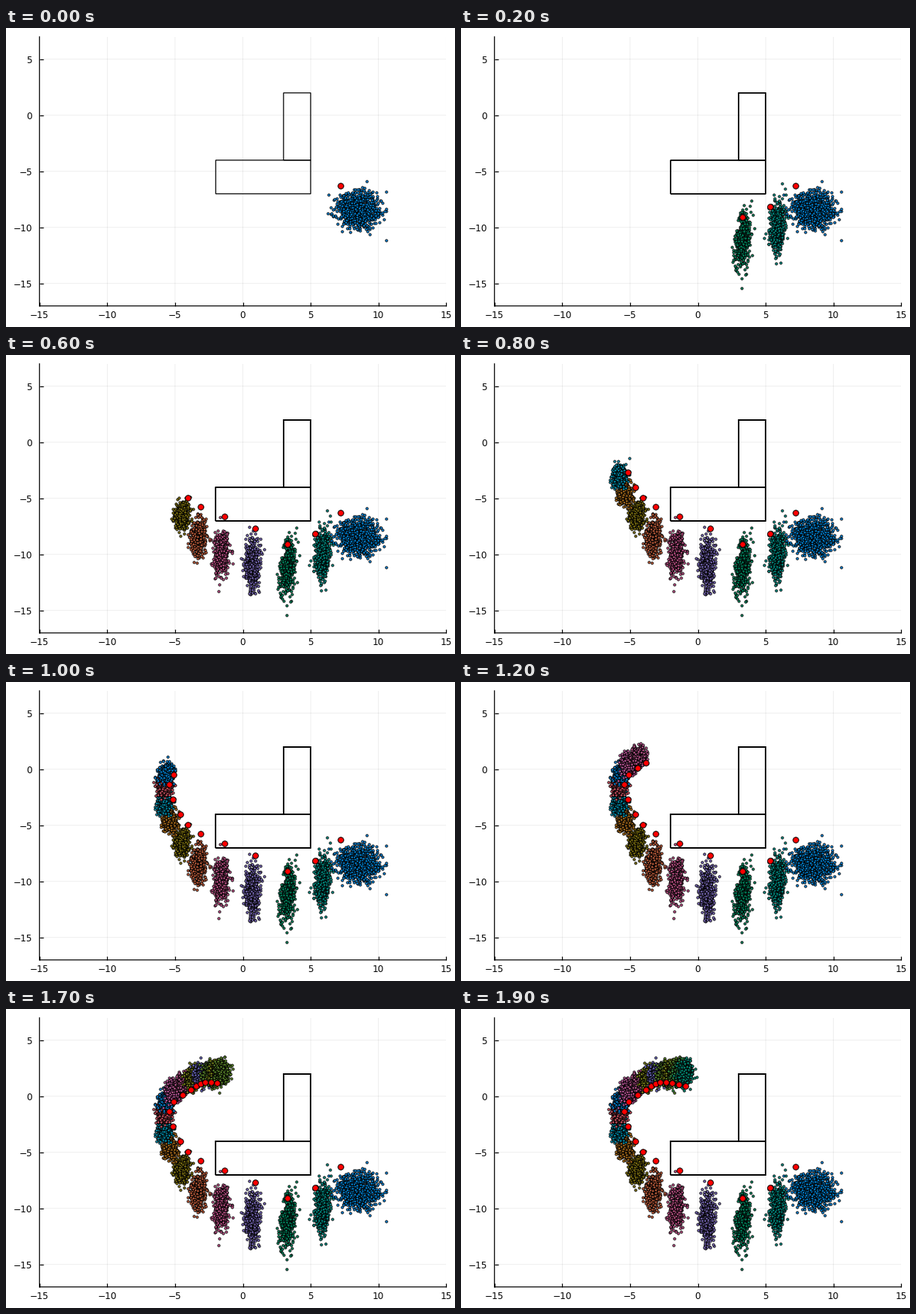
Animation, 600 px wide and 400 px high, one loop 2 s. Source, as a matplotlib script:

```python
import numpy as np
import matplotlib.pyplot as plt
from matplotlib.animation import FuncAnimation
from matplotlib.patches import Rectangle

W, H, DPI = 600, 400, 100
STEPS, INTERVAL = 20, 100
PX = 72 / DPI  # one pixel in points
LINE = 1.25 * PX

COLORS = (
    "#009afa #00a99d #00a070 #8f7bd8 #e0609f #e36f47 #9a8a14 #c98020 "
    "#00a9cc #f06073 #009afa #dd65b6 #dd65a8 #8e971e #7f7ce0 #6c9f33 "
    "#8e971e #6c9f33 #3ea44e #00a98d"
).split()

# (step, x, y) knots of the two paths
CLOUD_KNOTS = [(0, 8.48, -8.42), (2, 3.29, -11.08), (4, -1.62, -9.95),
               (7, -5.37, -4.6), (10, -5.65, -.35), (13, -3.7, 1.6),
               (16, -1.95, 2.12), (19, -.96, 2.1)]
BODY_KNOTS = [(0, 7.21, -6.25), (2, 3.29, -9.07), (3, .9, -7.7),
              (5, -3.12, -5.72), (7, -4.62, -4.02), (9, -5.43, -1.33),
              (12, -3.84, .57), (15, -2.77, 1.27), (19, -.93, .92)]

WALLS = [(-2, -7, 7, 3), (3, -4, 2, 6)]


def curve(knots):
    """Smooth path through the knots, sampled at every step."""
    t, *axes = np.transpose(knots)
    k = np.arange(STEPS)
    i = np.clip(np.searchsorted(t, k, side="right") - 1, 0, len(t) - 2)
    h = t[i + 1] - t[i]
    u = (k - t[i]) / h
    out = []
    for v in axes:
        m = np.gradient(v, t)
        out.append((1 + 2 * u) * (1 - u) ** 2 * v[i]
                   + u * (1 - u) ** 2 * h * m[i]
                   + u ** 2 * (3 - 2 * u) * v[i + 1]
                   + u ** 2 * (u - 1) * h * m[i + 1])
    return np.column_stack(out)


def particles(k, centre):
    """Round cloud at first, then narrow ones that shrink in height."""
    rng = np.random.default_rng(40 + k)
    if k == 0:
        return centre + .71 * rng.standard_normal((1000, 2))
    tall = .28 + .012 * k + .88 * np.exp(-((k - 2) / 3.4) ** 2)
    pts = rng.standard_normal((500, 2)) * (.26, tall)
    pts[:, 0] += .04 * pts[:, 1]
    return centre + pts


def dots(pts, color, size, edge, z):
    x, y = np.transpose(pts)
    return ax.scatter(x, y, s=(size * PX) ** 2, c=color, edgecolors="black",
                      linewidths=edge * PX, zorder=z)


def wall(x, y, w, h):
    return ax.add_patch(Rectangle((x, y), w, h, fill=False, ec="black",
                                  lw=LINE, snap=False, zorder=2))


plt.rcParams["font.family"] = "DejaVu Sans"
fig = plt.figure(figsize=(W / DPI, H / DPI), dpi=DPI, facecolor="white")
ax = fig.add_axes([44.7 / W, 28.2 / H, 543.6 / W, 360 / H])
ax.set_xlim(-15, 15)
ax.set_ylim(-17, 7)
ax.set_xticks(range(-15, 16, 5))
ax.set_yticks(range(-15, 6, 5))
ax.set_axisbelow(True)
ax.grid(color="black", alpha=.1, lw=.65 * PX)
ax.tick_params(direction="in", length=5 * PX, width=LINE, labelsize=8.7)
ax.tick_params(axis="x", pad=4.7)
ax.tick_params(axis="y", pad=7)
ax.spines[["top", "right"]].set_visible(False)
ax.spines[["left", "bottom"]].set_linewidth(LINE)
for line in (*ax.get_xgridlines(), *ax.get_ygridlines(),
             *ax.get_xticklines(), *ax.get_yticklines(),
             *ax.spines.values()):
    line.set_snap(False)

# walls are drawn again with every step, so their soft edges darken
layers = []
for k, (centre, body) in enumerate(zip(curve(CLOUD_KNOTS),
                                       curve(BODY_KNOTS))):
    layers.append([wall(*w) for w in WALLS] + [
        dots(particles(k, centre), COLORS[k], 3.2, .85, 3 + k),
        dots([body], "red", 7.6, 1, 30 + k),
    ])


def update(i):
    for k, layer in enumerate(layers):
        for artist in layer:
            artist.set_visible(k <= i)
    return [a for layer in layers for a in layer]


anim = FuncAnimation(fig, update, frames=STEPS, interval=INTERVAL,
                     init_func=lambda: update(0), repeat=True,
                     repeat_delay=0, blit=False)
plt.show()
```
